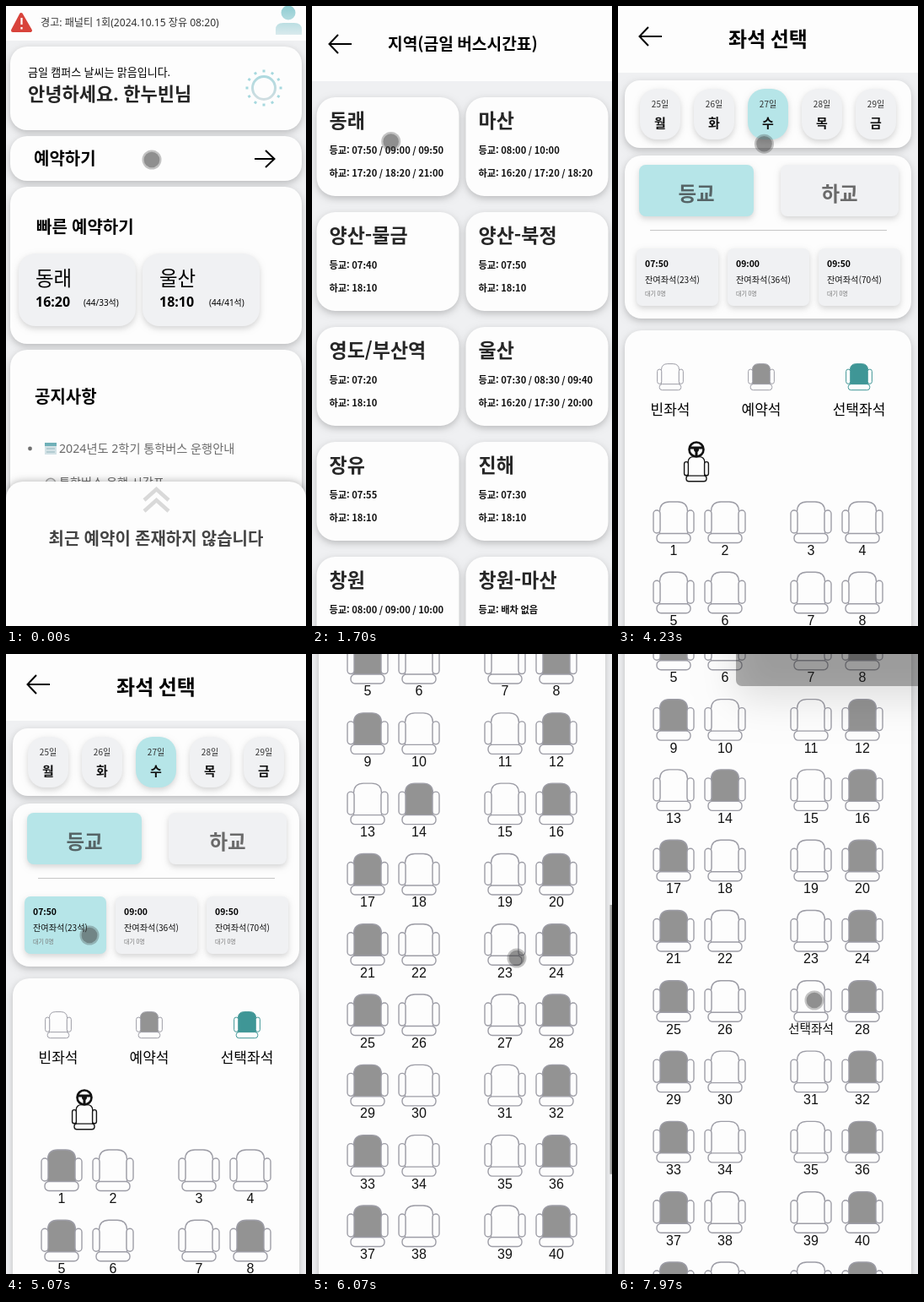
Write an HTML page with a canvas that moves like this. It is 356 by 734 pixels and loops after 8000 ms.

```html
<!DOCTYPE html>
<html lang="ko">
<head>
<meta charset="utf-8">
<title>통학버스 예약</title>
<style>
html, body { margin: 0; width: 100%; height: 100%; overflow: hidden; background: #eff0f2; }
canvas { display: block; }
</style>
</head>
<body>
<canvas width="356" height="734"></canvas>
<script>
const W = 356, H = 734, LOOP = 8000;
const PAGE = '#eff0f2', CARD = '#fdfdfd', CHIP = '#f0f1f3', CHOSEN = '#b6e5e8';
const TAKEN = '#939393', TEAL = '#3f9696', LINE = '#9d9da6', INK = '#262626';
const HOME_FONT = '"Noto Sans", "Noto Sans CJK KR", sans-serif';
const BODY_FONT = '"Noto Sans CJK KR", "Noto Sans", sans-serif';
const LABEL_FONT = '"Liberation Sans", Arial, sans-serif';

// Hard changes, in ms
const REGIONS = 870, SEATS = 2070, DATE = 3270, TIMES = 3730, TIME = 4860, MAP = 5070;
const ASK = 6850, ANSWER = 7860;

const c = document.querySelector('canvas').getContext('2d');
let font = HOME_FONT;

const ramp = (t, a, b) => Math.min(1, Math.max(0, (t - a) / (b - a)));
const ease = (t, a, b) => { const p = ramp(t, a, b); return p * p * (3 - 2 * p); };

// y is the visual middle of the line
function text(s, x, y, size, weight = 400, color = '#000', align = 'left') {
  c.font = `${weight} ${size}px ${font}`;
  c.textAlign = align;
  c.fillStyle = color;
  c.fillText(s, x, y + size * .37);
}

function box(x, y, w, h, r, fill, shadow = 'rgba(0,0,0,.22)', blur = 8, dy = 3) {
  c.save();
  c.shadowColor = shadow;
  c.shadowBlur = blur;
  c.shadowOffsetY = dy;
  c.fillStyle = fill;
  c.beginPath();
  c.roundRect(x, y, w, h, r);
  c.fill();
  c.restore();
}

const card = (x, y, w, h, r = 20) => box(x, y, w, h, r, CARD);
const chip = (x, y, w, h, r, chosen) => box(x, y, w, h, r, chosen ? CHOSEN : CHIP, 'rgba(0,0,0,.16)', 7, 3);

function rect(x, y, w, h, fill) {
  c.fillStyle = fill;
  c.fillRect(x, y, w, h);
}

function disc(x, y, r, fill) {
  c.fillStyle = fill;
  c.beginPath();
  c.arc(x, y, r, 0, 7);
  c.fill();
}

function stroke(d, color, width) {
  c.strokeStyle = color;
  c.lineWidth = width;
  c.stroke(new Path2D(d));
}

function gradient(y0, y1, from, to) {
  const g = c.createLinearGradient(0, y0, 0, y1);
  g.addColorStop(0, from);
  g.addColorStop(1, to);
  return g;
}

// Home

function sun(t) {
  c.save();
  c.translate(306, 97);
  c.strokeStyle = gradient(-22, 22, '#a3d8de', '#dadfe2');
  c.lineWidth = 3;
  c.beginPath();
  c.arc(0, 0, 13.5, 0, 7);
  c.stroke();
  c.rotate(t / 4000);
  for (let i = 0; i < 12; i++) {
    c.rotate(Math.PI / 6);
    c.beginPath();
    c.moveTo(0, -18.5);
    c.lineTo(0, -21.5);
    c.stroke();
  }
  c.restore();
}

function homeHeader() {
  rect(0, 0, W, 41, CARD);
  c.fillStyle = '#d8433b';
  const sign = 'M18 10 L29 29 H8 Z';
  c.fill(new Path2D(sign));
  c.lineJoin = 'round';
  stroke(sign, '#d8433b', 4);
  stroke('M18.5 14 V22 M18.5 25 V27.5', '#fff', 2.2);
  text('경고: 패널티 1회(2024.10.15 장유 08:20)', 41, 20, 12.1, 400, '#333');
  const fade = gradient(0, 35, '#8fcdd2', '#dcebee');
  disc(335, 8, 8.5, fade);
  c.fillStyle = fade;
  c.fill(new Path2D('M320 34 V28 Q320 20 329 20 H342 Q351 20 351 28 V34 Z'));
}

function quickChip(x, name, time, seats, seatX) {
  chip(x, 293, 139, 86, 20);
  text(name, x + 20, 322, 23.5);
  text(time, x + 20, 350, 16, 700);
  text(seats, seatX, 351, 10, 500);
}

function home(t) {
  font = HOME_FONT;
  rect(0, 0, W, H, PAGE);
  homeHeader();
  card(5, 48, 346, 99);
  text('금일 캠퍼스 날씨는 맑음입니다.', 26, 78, 13, 500);
  text('안녕하세요. 한누빈님', 26, 104, 22, 700, INK);
  sun(t);
  card(5, 154, 346, 53);
  text('예약하기', 33, 181, 20, 700);
  c.lineJoin = 'miter';
  stroke('M295 181 H318 M308 171 L318.5 181 L308 191', '#000', 2);
  card(5, 214, 346, 186);
  text('빠른 예약하기', 36, 262, 20, 700);
  quickChip(15, '동래', '16:20', '(44/33석)', 92);
  quickChip(162, '울산', '18:10', '(44/41석)', 241);
  card(5, 407, 346, 400);
  text('공지사항', 34, 463, 20, 700);
  disc(28.5, 524, 2.4, '#707070');
  rect(46, 517, 14, 14, '#d3e2e6');
  rect(46, 517, 14, 4, '#6fb0b8');
  stroke('M48 524 H58 M48 528 H58', '#93b5bd', 1.2);
  text('2024년도 2학기 통학버스 운행안내', 63, 524, 14.2, 400, '#6a6a6a');
  disc(53, 565, 6.5, '#a5a5a5');
  disc(53, 565, 5, '#e9ebec');
  text('통학버스 운행 시간표', 63, 564, 14.2, 400, '#6a6a6a');
  box(0, 563, W, 200, 20, CARD, 'rgba(0,0,0,.25)', 9, -1);
  c.lineJoin = 'miter';
  stroke('M164 585 L178.500 572 L193 585 M164 598 L178.500 585 L193 598', '#d9d9d9', 4.5);
  text('최근 예약이 존재하지 않습니다', 178, 631, 20, 700, '#444', 'center');
}

// Region list

const regions = [
  ['동래', '07:50 / 09:00 / 09:50', '17:20 / 18:20 / 21:00'],
  ['마산', '08:00 / 10:00', '16:20 / 17:20 / 18:20'],
  ['양산-물금', '07:40', '18:10'],
  ['양산-북정', '07:50', '18:10'],
  ['영도/부산역', '07:20', '18:10'],
  ['울산', '07:30 / 08:30 / 09:40', '16:20 / 17:30 / 20:00'],
  ['장유', '07:55', '18:10'],
  ['진해', '07:30', '18:10'],
  ['창원', '08:00 / 09:00 / 10:00', ''],
  ['창원-마산', '배차 없음', '']
];

function regionPage() {
  font = BODY_FONT;
  rect(0, 0, W, H, PAGE);
  rect(0, 0, W, 89, CARD);
  stroke('M47 45 H21 M31 34 L20.500 45 L31 56', '#000', 2);
  text('지역(금일 버스시간표)', 90, 45, 19.2, 700);
  regions.forEach(([name, go, back], i) => {
    const x = i % 2 ? 182.5 : 5.5, y = 108 + 136 * (i >> 1);
    card(x, y, 169, 117, 22);
    text(name, x + 15, y + 27, 23, 700, INK);
    text('등교: ' + go, x + 15, y + 63, 11.2, 700, '#111');
    text('하교: ' + back, x + 15, y + 90, 11.2, 700, '#111');
  });
}

// Seat selection

const seatBack = new Path2D('M8.500 40 V12 Q9 1 20 1 H30 Q41 1 41.500 12 V40 Z');
const seatParts = new Path2D();
seatParts.roundRect(1, 11, 8, 27, 4);
seatParts.roundRect(41, 11, 8, 27, 4);
seatParts.roundRect(5, 38.5, 40, 11, 5);

function seat(x, y, size, fill = CARD, line = LINE, width = 1.4) {
  c.save();
  c.translate(x, y);
  c.scale(size / 50, size / 50);
  c.strokeStyle = line;
  c.lineWidth = width * 50 / size;
  c.fillStyle = fill;
  c.fill(seatBack);
  c.stroke(seatBack);
  c.fillStyle = CARD;
  c.fill(seatParts);
  c.stroke(seatParts);
  c.restore();
}

const isTaken = n => n % 4 === 0 && n > 4 || n % 4 === 1 && n !== 13 || n === 14;

function dates(t) {
  card(8, 88, 340, 80, 18);
  [...'월화수목금'].forEach((day, i) => {
    const x = 50 + 64 * i;
    chip(x - 24, 98, 48, 60, 20, i === 2 && t >= DATE);
    text(25 + i + '일', x, 116, 10, 400, '#333', 'center');
    text(day, x, 138, 15, 700, '#111', 'center');
  });
  // tap highlight
  if (t >= DATE) rect(154, 98, 48, 60, `rgba(51,181,229,${.4 * (1 - ramp(t, 3330, 3500))})`);
}

function timeCards(t) {
  [['07:50', 23], ['09:00', 36], ['09:50', 70]].forEach(([time, left], i) => {
    const x = 22 + 108 * i;
    chip(x, 287, 97, 68, 7, i === 0 && t >= TIME);
    text(time, x + 10, 305, 10.4, 700);
    text(`잔여좌석(${left}석)`, x + 10, 324, 10.2, 500, '#111');
    text('대기 0명', x + 10, 340, 7, 400, '#777');
  });
}

function wheel(x, y) {
  c.save();
  c.translate(x, y);
  stroke('M-8 -2 H8 M0 0 V8', '#111', 3);
  c.lineWidth = 2.6;
  c.beginPath();
  c.arc(0, 0, 8.5, 0, 7);
  c.stroke();
  disc(0, 0, 3, '#111');
  c.restore();
}

function seatMap(t, top) {
  card(8, top, 340, 1250, 20);
  [['빈좌석', 62, CARD, LINE], ['예약석', 170, TAKEN, LINE], ['선택좌석', 286, TEAL, TEAL]].forEach(([name, x, fill, line]) => {
    seat(x - 16, top + 39, 32, fill, line, 1);
    text(name, x, top + 94, 17, 400, '#000', 'center');
  });
  seat(78, top + 149, 30, CARD, '#151515', 1.4);
  wheel(93, top + 141);
  for (let n = 1; n <= 44; n++) {
    const x = [41, 102, 204, 265][(n - 1) % 4], y = top + 202 + 83.3 * (n - 1 >> 2);
    seat(x, y, 50, t >= MAP && isTaken(n) ? TAKEN : CARD);
    const picked = n === 27 && t >= ANSWER;
    font = picked ? BODY_FONT : LABEL_FONT;
    text(picked ? '선택좌석' : n, x + 25, y + 58, picked ? 14.7 : 16, 400, '#111', 'center');
  }
  font = BODY_FONT;
}

function seatPage(t) {
  font = BODY_FONT;
  rect(0, 0, W, H, PAGE);
  const scroll = 700 * ease(t, 5480, 6130);
  const loaded = t >= TIMES;
  c.save();
  c.translate(0, -scroll);
  rect(0, 0, W, 79, CARD);
  stroke('M52 36 H26 M36 25 L25.500 36 L36 47', '#000', 2);
  text('좌석 선택', 178, 39, 24, 700, '#000', 'center');
  dates(t);
  card(8, 177, 340, loaded ? 193 : 181, 20);
  chip(25, 188, 136, 61, 8, t >= DATE);
  chip(193, 188, 140, 61, 8);
  text('등교', 93, 222, 23.5, 700, '#566466', 'center');
  text('하교', 263, 222, 23.5, 700, '#6a6a6a', 'center');
  rect(38, 265, 281, 1, '#c6c6c6');
  if (loaded) timeCards(t);
  else if (t >= DATE) text('좌석을 불러오고 있습니다.', 178, 316, 16.1, 400, '#111', 'center');
  seatMap(t, loaded ? 384 : 372);
  c.restore();

  if (t >= 5480) rect(353.5, scroll * H / 1690, 2.5, H * H / 1690, `rgba(160,160,160,${1 - ramp(t, 6200, 6500)})`);
  dialog(t);
}

// Dark prompt that hangs in from above, fading in and out
function dialog(t) {
  const alpha = ramp(t, ASK, 7000) * (1 - ramp(t, ANSWER - 10, 8040));
  if (!alpha) return;
  c.save();
  c.globalAlpha = alpha;
  box(140, -120, 300, 158, 7, '#2b2b2b', 'rgba(0,0,0,.35)', 45, 14);
  c.restore();
}

// Pointer: each move is [start, end, x, y]

const moves = [
  [1500, 1720, 92, 160], [2670, 2930, 181, 146], [4100, 4800, 99, 333],
  [5370, 5500, 243, 360], [6200, 6500, 231, 410], [7470, 7530, 233, 410]
];

function pointer(t) {
  let x = 173, y = 182;
  for (const [a, b, tx, ty] of moves) {
    const p = ease(t, a, b);
    x += (tx - x) * p;
    y += (ty - y) * p;
  }
  disc(x, y, 11.5, 'rgba(60,60,60,.3)');
  disc(x, y, 9.3, 'rgba(60,60,60,.38)');
}

function frame(now) {
  const t = now % LOOP;
  if (t < REGIONS) home(t);
  else if (t < SEATS) regionPage();
  else seatPage(t);
  pointer(t);
  requestAnimationFrame(frame);
}
requestAnimationFrame(frame);
</script>
</body>
</html>
```
